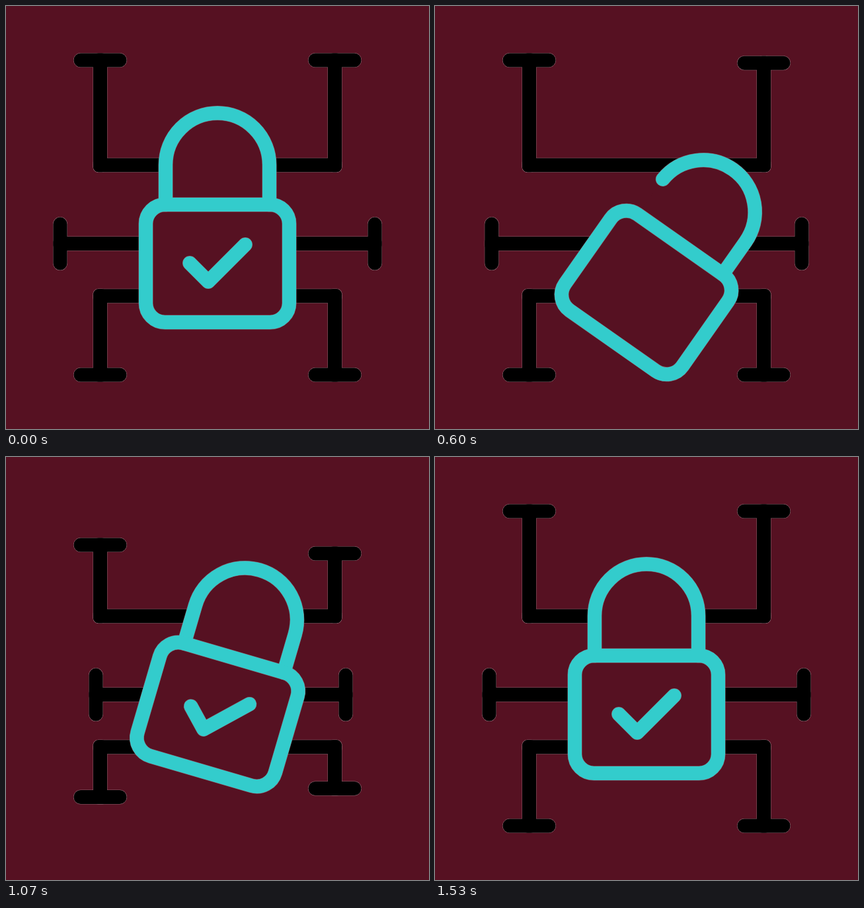
Write an HTML page with a canvas that moves like this. It is 640x640 px and loops after 1670 ms.

```html
<!DOCTYPE html>
<html lang="en">
<head>
<meta charset="utf-8">
<title>Lock animation</title>
<style>
  html, body { margin: 0; width: 100%; height: 100%; overflow: hidden; background: #561122; }
  canvas { display: block; width: 100vw; height: 100vh; object-fit: contain; }
</style>
</head>
<body>
<canvas id="stage" width="640" height="640"></canvas>
<script>
const LOOP = 1670, BG = '#561122', TEAL = '#33cccc', W = 21;
const RIM = '#8d6670', RIM_W = W + 1; // thin pale edge around every line
const ctx = document.getElementById('stage').getContext('2d');

const ease = p => p * p * (3 - 2 * p);

// Eased value from [step, value] keys
function track(keys, s) {
  if (s <= keys[0][0]) return keys[0][1];
  for (let i = 1; i < keys.length; i++) {
    const [a, va] = keys[i - 1], [b, vb] = keys[i];
    if (s < b) return va + (vb - va) * ease((s - a) / (b - a));
  }
  return keys[keys.length - 1][1];
}

const ANGLE = [[0, 0], [17, 36], [17.6, 36], [23.6, -36], [32, 16.3], [40, -7.8], [46, 0]];
const DROP = [[0, 0], [13.8, 46.5], [16.5, 46.5], [27.2, 0]];
const OPEN = [[0, 0], [13.5, 65.5], [18, 65.5], [22.6, 0]];
const CHECK = [[0, 1], [14.3, 0], [18, 0], [28, 1]];

// Connector arms: how far each retracts, and when it leaves and returns
const arm = (size, from, to, back) =>
  [[from, 0], [to, size], [back, size], [back + 7, 0]];
const ARMS = {
  topLeft: arm(51, 18, 24.1, 36.8),
  topRight: arm(64, 16.9, 24, 37.65),
  left: arm(54, 16.8, 24.2, 38.85),
  right: arm(44, 16.8, 24.2, 37.65),
  lowLeft: arm(43.5, 18.1, 24.5, 38.95),
  lowRight: arm(56.5, 18, 24.1, 36.8)
};
const HIGH = 240.8, MID = 359.6, LOW = 438.8, CORNER = 8;

// Inner and outer ends of the snap sparks
const SPARKS = [[129, 271, 99, 251], [127, 320, 92, 321], [129, 368, 95, 381]];
const HEAD = [[20.5, 0], [23, 1]];
const TAIL = [[23, 0], [26, 1]];

function bar(x1, y1, x2, y2, w, r) {
  ctx.beginPath();
  ctx.roundRect(Math.min(x1, x2) - w / 2, Math.min(y1, y2) - w / 2,
    Math.abs(x2 - x1) + w, Math.abs(y2 - y1) + w, r);
  ctx.fill();
}

function tee(x, y, base, w) {
  bar(x - 29.5, y, x + 29.5, y, w, w / 2);
  bar(x, y, x, base, w, CORNER);
}

function drawArms(s, color, w) {
  const off = name => track(ARMS[name], s);
  const left = 82 + off('left'), right = 558 - off('right');
  ctx.fillStyle = color;
  tee(142.5, 82 + off('topLeft'), HIGH, w);
  tee(497.5, 82 + off('topRight'), HIGH, w);
  tee(142.5, 558 - off('lowLeft'), LOW, w);
  tee(497.5, 558 - off('lowRight'), LOW, w);
  bar(142.5, HIGH, 497.5, HIGH, w, CORNER);
  bar(142.5, LOW, 497.5, LOW, w, CORNER);
  bar(left, MID, right, MID, w, CORNER);
  for (const x of [left, right]) bar(x, MID - 29.5, x, MID + 29.5, w, w / 2);
}

function shacklePath(trim) {
  const p = new Path2D(), r = 78.5, top = -149, leg = 60;
  p.moveTo(r, top + leg);
  p.lineTo(r, top);
  p.arc(0, top, r, 0, -Math.PI + Math.max(0, trim - leg) / r, true);
  if (trim < leg) p.lineTo(-r, top + leg - trim);
  return p;
}

function bodyPath() {
  const p = new Path2D();
  p.roundRect(-108.5, -89, 217, 178, 29);
  return p;
}

function checkPath(part) {
  const p = new Path2D(), shown = part * 118.8;
  if (shown <= 0) return p;
  const a = Math.min(shown, 39.6) * Math.SQRT1_2;
  const b = Math.max(0, shown - 39.6) * Math.SQRT1_2;
  p.moveTo(-42, -0.5);
  p.lineTo(-42 + a, -0.5 + a);
  if (b > 0) p.lineTo(-14 + b, 27.5 - b);
  return p;
}

function sparkPath(s) {
  const p = new Path2D(), head = track(HEAD, s), tail = track(TAIL, s);
  if (head <= tail) return p;
  for (const [x1, y1, x2, y2] of SPARKS) {
    p.moveTo(x1 + (x2 - x1) * tail, y1 + (y2 - y1) * tail);
    p.lineTo(x1 + (x2 - x1) * head, y1 + (y2 - y1) * head);
  }
  return p;
}

function strokeAll(paths) {
  ctx.lineCap = ctx.lineJoin = 'round';
  for (const [color, w] of [[RIM, RIM_W], [TEAL, W]]) {
    ctx.strokeStyle = color;
    ctx.lineWidth = w;
    for (const p of paths) ctx.stroke(p);
  }
}

function drawLock(s) {
  const body = bodyPath();
  ctx.save();
  ctx.translate(320, 389.5 + track(DROP, s));
  ctx.rotate(track(ANGLE, s) * Math.PI / 180);
  ctx.fillStyle = BG;
  ctx.fill(shacklePath(0));
  ctx.fill(body);
  strokeAll([shacklePath(track(OPEN, s)), body, checkPath(track(CHECK, s))]);
  ctx.restore();
}

function draw(ms) {
  // 30 steps per second on a 10 ms clock
  const s = Math.floor((Math.floor(ms / 10) * 3 + 1) / 10);
  ctx.fillStyle = BG;
  ctx.fillRect(0, 0, 640, 640);
  drawArms(s, RIM, RIM_W);
  drawArms(s, '#000', W);
  drawLock(s);
  strokeAll([sparkPath(s)]);
}

const start = performance.now();
function tick() {
  draw((performance.now() - start) % LOOP);
  requestAnimationFrame(tick);
}
tick();
</script>
</body>
</html>
```
